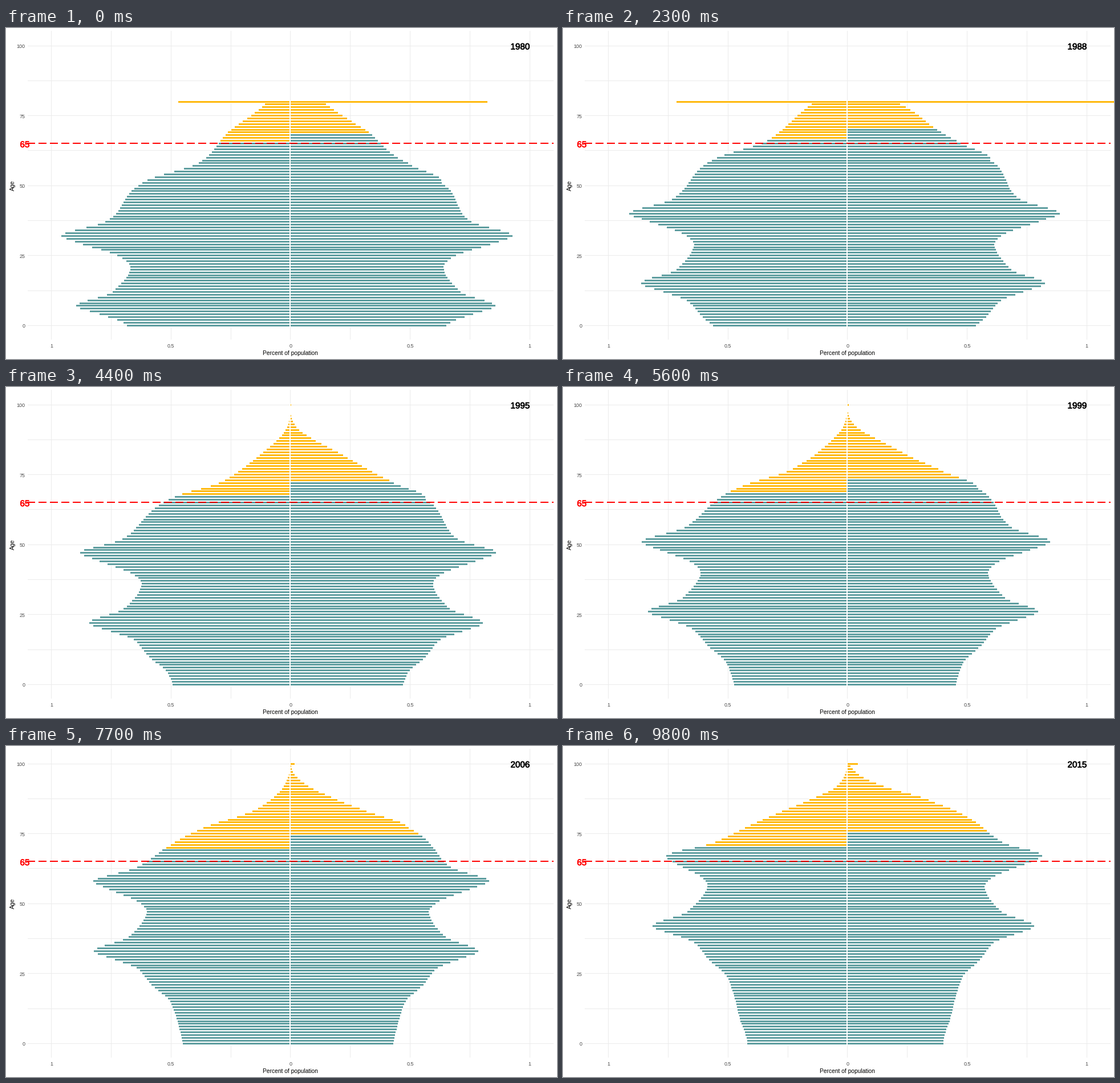
Write a matplotlib script that moves like this. It is 966 px wide and 580 px high and loops after 10 s.

```python
import matplotlib.pyplot as plt
import numpy as np
from matplotlib.animation import FuncAnimation
from matplotlib.collections import PolyCollection
from matplotlib.patheffects import withStroke

W, H, DPI = 966, 580, 100
ZERO, UNIT = 498.8, 419.2        # x of 0 %, pixels per 1 %
BASE, STEP = 521.3, 4.903        # y of age 0, pixels per year of age
LEFT, RIGHT, TOP, BOTTOM = 38, 960, 5, 546
TEAL, GOLD, GRID = "#5F9EA0", "#FFB90F", "#EBEBEB"

# Male cohort size in pixels by birth year: two baby booms, then decline.
COHORTS = np.array([
    (1891, 90), (1901, 104), (1911, 147), (1917, 157), (1922, 178),
    (1928, 265), (1932, 290), (1940, 312), (1943, 329), (1948, 405),
    (1950, 380), (1956, 295), (1959, 281), (1968, 312), (1973, 376),
    (1976, 335), (1979, 293), (1985, 264), (1991, 229), (1996, 218),
    (2006, 204), (2015, 190)], float)

# Women per man by birth year, highest where war took the men.
SEX_RATIO = np.array([
    (1895, 1.05), (1908, 1.05), (1914, 1.12), (1922, 1.22), (1929, 1.0),
    (1940, 0.98), (1947, 0.97), (1955, 0.955)])

# Mortality: level, reference age, growth per year, cohort gain, drift.
MEN = (0.19, 67, 0.097, 0.012, 0.0005)
WOMEN = (0.83, 90, 0.12, 0.035, 0.0009)


def smooth(x, xs, ys):
    """Monotone cubic curve through key points, flat at the extremes."""
    h = np.diff(xs)
    s = np.diff(ys) / h
    m = np.zeros(len(xs))
    a, b = s[:-1], s[1:]
    same = a * b > 0
    m[1:-1][same] = (2 * a * b)[same] / (a + b)[same]
    x = np.clip(x, xs[0], xs[-1])
    i = np.clip(np.searchsorted(xs, x, side="right") - 1, 0, len(h) - 1)
    t, h = (x - xs[i]) / h[i], h[i]
    return ((1 + 2 * t) * (1 - t) ** 2 * ys[i] + t * (1 - t) ** 2 * h * m[i]
            + t * t * (3 - 2 * t) * ys[i + 1] - t * t * (1 - t) * h * m[i + 1])


def survival(ages, born, law):
    level, ref, growth, gain, drift = law
    gompertz = level * np.exp(growth * (ages - ref) - gain * (born - 1925))
    return np.exp(-gompertz - drift * np.maximum(ages - 25, 0))


def bars(n):
    """Ages and bar lengths n years after 1980, open age group on top."""
    top = 80 if n < 10 else 100
    ages = np.arange(top + 1)
    born = 1980 + n - ages
    size = smooth(born, *COHORTS.T) * (1 - 0.0054 * n + 0.000094 * n * n)
    men = size * survival(ages, born, MEN)
    women = size * np.interp(born, *SEX_RATIO.T) * survival(ages, born, WOMEN)
    if top == 80:
        men[-1], women[-1] = 197 + 12.8 * n, min(345 + 23.2 * n, W - ZERO)
    else:
        women[-1] = 18 * ((n - 10) / 25) ** 2
        men[-1] = women[-1] / 9
    return ages, men, women


def rect(x0, y0, x1, y1):
    return [(x0, y0), (x1, y0), (x1, y1), (x0, y1)]


def y_of(age):
    return BASE - STEP * age


fig = plt.figure(figsize=(W / DPI, H / DPI), dpi=DPI, facecolor="white")
ax = fig.add_axes([0, 0, 1, 1])
ax.set_xlim(0, W)
ax.set_ylim(H, 0)
ax.axis("off")


def layer(verts, color, z):
    return ax.add_collection(
        PolyCollection(verts, facecolors=color, linewidths=0, zorder=z),
        autolim=False)


def label(x, y, s, px, color="black", **kw):
    return ax.text(x, y, s, fontsize=px * 72 / DPI, color=color,
                   family="Liberation Sans", zorder=6, **kw)


def heavy(x, y, s, color):
    return label(x, y, s, 15.2, color, ha="center",
                 path_effects=[withStroke(linewidth=0.5, foreground=color)])


grid = []
for k in range(9):
    x = int(ZERO + UNIT * (k - 4) / 4)
    y = int(y_of(12.5 * k))
    grid += [rect(x, TOP, x + 1, BOTTOM), rect(LEFT, y, RIGHT, y + 1)]
layer(grid, GRID, 1)

back = layer([], "white", 2)
fill = layer([], TEAL, 3)
axis_gap = layer([], "white", 4)
line_y = int(y_of(65))
layer([rect(x, line_y - 1, min(x + 14, RIGHT), line_y + 1)
       for x in range(LEFT - 1, RIGHT, 20)], "red", 5)

for age in range(0, 101, 25):
    label(33.5, y_of(age) + 4, str(age), 9, "#4D4D4D", ha="right")
for k, s in enumerate(("1", "0.5", "0", "0.5", "1")):
    label(ZERO + UNIT * (k - 2) / 2, 559.5, s, 9, "#4D4D4D", ha="center")
label(498.5, 573, "Percent of population", 10.3, ha="center")
label(11.5, 276, "Age", 10.3, rotation=90, ha="center", va="center")
heavy(33, 209, "65", "red")
year_text = heavy(901.5, 37.5, "", "black")


def years_passed(i):
    """Three ticks per year, two per year for the last stretch."""
    return (i + 1) // 3 if i < 86 else 29 + (i - 86) // 2


def draw(i):
    n = years_passed(i)
    ages, men, women = bars(n)
    old_man = int(66 + 0.16 * n)
    old_woman = int(69.4 + 0.3 * n - 0.003 * n * n)
    under, over, colors = [], [], []
    for age, m, w in zip(ages, men, women):
        y = int(y_of(age)) - 1
        x0, x1 = round(ZERO - m), round(ZERO + w)
        under.append(rect(x0 - 1, y - 1, x1 + 1, y + 4))
        over += [rect(x0, y, 498, y + 3), rect(498, y, x1, y + 3)]
        colors += [GOLD if age >= old_man else TEAL,
                   GOLD if age >= old_woman else TEAL]
    back.set_verts(under)
    fill.set_verts(over)
    fill.set_facecolor(colors)
    axis_gap.set_verts([rect(497, int(y_of(ages[-1])) - 2, 499, 524)])
    year_text.set_text(str(1980 + n))
    return back, fill, axis_gap, year_text


anim = FuncAnimation(fig, draw, frames=100, init_func=lambda: draw(0),
                     interval=100, repeat=True, repeat_delay=0, blit=False)
plt.show()
```
